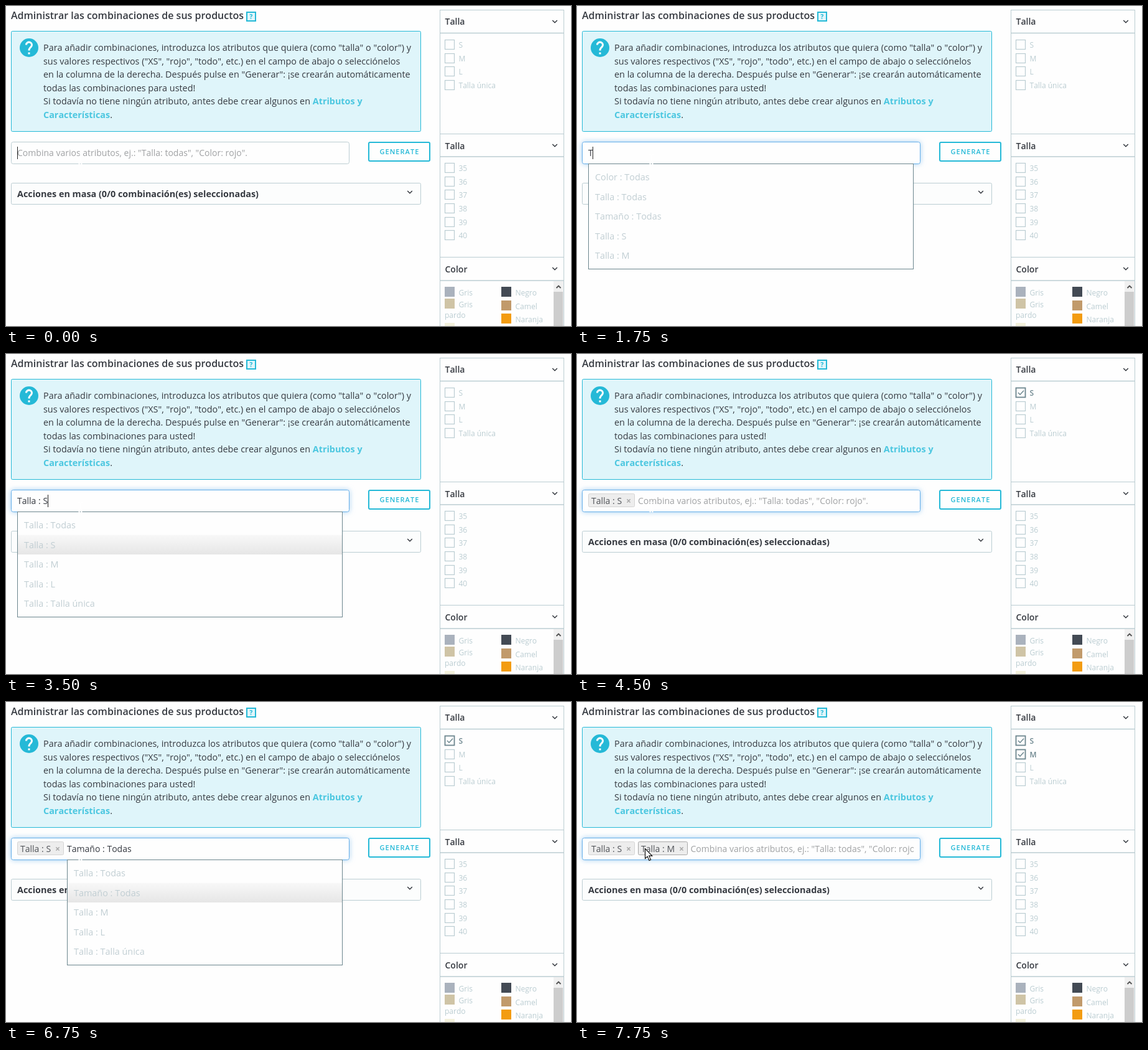
An HTML page for the animation above (8000 ms loop, 908 px wide and 514 px high).

```html
<!DOCTYPE html>
<html lang="es">
<head>
<meta charset="utf-8">
<title>Combinaciones</title>
<style>
  html, body { margin: 0; width: 100%; height: 100%; overflow: hidden; background: #fefefe; }
  svg { display: block; }
  text { font: 14px "Open Sans", sans-serif; font-kerning: none; fill: #363a41; }
  .title { font-size: 16px; font-weight: 600; }
  .body { font-size: 14.4px; }
  .bold { font-size: 14.4px; font-weight: 700; }
  .head { font-weight: 600; }
  .link { font-weight: 700; fill: #4cc7e0; }
  .hint { fill: #a0a2a4; }
  .item { font-size: 14.4px; fill: #c1ced3; }
  .label { font-size: 12px; fill: #bbcdd2; }
  .checked { font-size: 12px; font-weight: 600; fill: #6c868e; }
  .button { font-size: 11px; font-weight: 600; letter-spacing: 1.04px; fill: #25b9d7; }
  .badge { font-size: 10px; font-weight: 700; fill: #25b9d7; text-anchor: middle; }
  .chip { fill: #505358; }
  .close { font-weight: 700; fill: #a9a9a9; text-anchor: middle; }
  .field { fill: #fefefe; stroke: #bbcdd2; }
  .focus { stroke: #66afe9; filter: drop-shadow(0 0 4px rgba(102, 175, 233, .6)); }
</style>
</head>
<body>
<svg width="908" height="514" viewBox="0 0 908 514">
  <defs>
    <linearGradient id="pick" x2="0" y2="1">
      <stop stop-color="#f8f8f8"/><stop offset="1" stop-color="#e6e6e6"/>
    </linearGradient>
    <clipPath id="inside"><rect x="9" y="219" width="532" height="34"/></clipPath>
  </defs>
  <g id="page"></g>
  <g id="live"></g>
</svg>
<script>
const page = document.getElementById('page');
const live = document.getElementById('live');

const text = (x, y, string, kind = '') => `<text x="${x}" y="${y}" class="${kind}">${string}</text>`;
const rect = (x, y, w, h, look) => `<rect x="${x}" y="${y}" width="${w}" height="${h}" ${look}/>`;
const path = (d, look) => `<path d="${d}" ${look}/>`;
const chevron = (x, y) =>
  path(`M${x - 3.8} ${y - 2}l3.8 3.8 3.8-3.8`, 'fill="none" stroke="#363a41" stroke-width="1.5"');

const HINT = 'Combina varios atributos, ej.: "Talla: todas", "Color: rojo".';
const LINE = 'fill="none" stroke="#bbcdd2"';

function drawPage() {
  const help = [
    'Para añadir combinaciones, introduzca los atributos que quiera (como "talla" o "color") y',
    'sus valores respectivos ("XS", "rojo", "todo", etc.) en el campo de abajo o selecciónelos',
    'en la columna de la derecha. Después pulse en "Generar": ¡se crearán automáticamente',
    'todas las combinaciones para usted!',
    'Si todavía no tiene ningún atributo, antes debe crear algunos en <tspan class="link">Atributos y</tspan>',
    '<tspan class="link">Características</tspan>.'
  ];
  const panels = [['Talla', 6, 43], ['Talla', 205, 241.5], ['Color', 403, 440.5]];
  const colors = [
    [705, 451, '#aab2bd', 'Gris'], [705, 470, '#cfc4a6', 'Gris'], [705, 509, '#f3f1dc', ''],
    [796, 451, '#434a54', 'Negro'], [796, 473, '#c19a6b', 'Camel'], [796, 494, '#f39c11', 'Naranja']
  ];
  page.innerHTML =
    text(8, 21, 'Administrar las combinaciones de sus productos', 'title') +
    rect(387, 10, 14, 14, 'fill="#dff5fa" stroke="#25b9d7" stroke-width="2"') +
    text(394, 21, '?', 'badge') +
    rect(8.5, 40.5, 658, 161, 'rx="2" fill="#dff5fa" stroke="#25b9d7"') +
    '<circle cx="37" cy="67" r="15" fill="#25b9d7"/>' +
    path('M9 9a3 3 0 1 1 5.1 2.1l-.9.9Q12 13.2 12 15M12 17v2',
      'transform="translate(19 49) scale(1.5)" fill="none" stroke="#fff" stroke-width="2"') +
    help.map((line, i) => text(60, 72 + 21.6 * i, line, 'body')).join('') +
    rect(583, 219, 98, 30, 'rx="2" fill="#fefefe" stroke="#25b9d7" stroke-width="2"') +
    text(600.5, 238, 'GENERATE', 'button') +
    rect(8.5, 284.5, 658, 34, 'rx="2" fill="#fcfdfd" stroke="#bbcdd2"') +
    text(18, 307, 'Acciones en masa (0/0 combinación(es) seleccionadas)', 'bold') +
    chevron(649, 299) +
    rect(697.5, 6.5, 199, 520, LINE) +
    panels.map(([name, top, rule]) =>
      path(`M697 ${top + .5}H897`, LINE) +
      path(`M697 ${rule + .5}H897`, LINE + ' stroke-width="1.6"') +
      text(705.5, top + (top > 6 ? 24.5 : 24), name, 'head') +
      chevron(882, top + 19)).join('') +
    colors.map(([x, y, fill, name]) =>
      rect(x, y, 16, 16, `fill="${fill}"`) + text(x + 22.5, y + 13.8, name, 'label')).join('') +
    text(705, 501, 'pardo', 'label') +
    rect(880, 442, 16, 72, 'fill="#f0f0f0"') +
    rect(880, 459, 15, 55, 'fill="#cdcdcd"') +
    path('M884.5 453l3.5-3.5 3.5 3.5', 'fill="none" stroke="#505050" stroke-width="1.8"');
}

const checkbox = (y, name, on) =>
  rect(705.5, y + .5, 15, 15, `fill="#fefefe" stroke="${on ? '#6c868e' : '#bbcdd2'}" stroke-width="${on ? 1.8 : 1.2}"`) +
  (on ? path(`M709 ${y + 8}l3 3.2 6-6.4`, 'fill="none" stroke="#6c868e" stroke-width="1.5"') : '') +
  text(727.5, y + 13.3, name, on ? 'checked' : 'label');

const checkboxes = (top, names, chips) =>
  names.map((name, i) => checkbox(Math.round(top + 21.65 * i), name, chips.includes(name))).join('');

const CHIP_X = [18, 98], INPUT_X = [18, 98, 182.5];

const chip = (size, i, hover) => {
  const x = CHIP_X[i], w = i ? 79 : 74;
  return rect(x + .5, 224.5, w, 21, `rx="2" fill="#ededed" stroke="${hover ? '#a9a9a9' : '#d5d5d5'}"`) +
    text(x + 5, 241, 'Talla : ' + size, 'chip') + text(x + w - 9, 241, '×', 'close');
};

const dropdown = (x, items, pick) =>
  rect(x + .5, 253.5, 540 - x, 169, 'fill="#fefefe" stroke="#6c868e"') +
  (pick >= 0 ? rect(x + 1, 259 + 31.5 * pick, 539 - x, 31.5, 'fill="url(#pick)"') : '') +
  items.map((item, i) => text(x + 11, 280 + 31.5 * i, item, 'item')).join('');

const beam = path('M116.5 238.5h2l1 1 1-1h2M119.5 239v14M116.5 253.5h2l1-1 1 1h2', 'fill="none" stroke="#fff"');
const arrow = path('M109.5 235.5v16l3.7-3.4 2.8 6.4 2.6-1.1-2.8-6.3h5z', 'fill="#fff" stroke="#000" stroke-width="1.1"');

function draw({ focus, typed, chips, items, pick, caret, hover }) {
  const x = INPUT_X[chips.length];
  live.innerHTML =
    checkboxes(54, ['S', 'M', 'L', 'Talla única'], chips) +
    checkboxes(252, ['35', '36', '37', '38', '39', '40'], chips) +
    rect(8.5, 218.5, 543, 35, `rx="3" class="field ${focus ? 'focus' : ''}"`) +
    chips.map((size, i) => chip(size, i, hover && i === 1)).join('') +
    `<g id="entry" clip-path="url(#inside)">${text(x, 241, typed || HINT, typed ? '' : 'hint')}</g>` +
    (items ? dropdown(CHIP_X[chips.length], items, pick) : '') +
    (hover ? arrow : beam);
  if (caret) {
    const width = typed ? live.querySelector('#entry text').getComputedTextLength() : 0;
    live.insertAdjacentHTML('beforeend', rect(Math.floor(x + width), 226, 1, 20, 'fill="#222"'));
  }
}

const all = name => name + ' : Todas';
const sizes = list => list.map(size => 'Talla : ' + size);
const [COLOR, SIZE, FIT] = ['Color', 'Talla', 'Tamaño'].map(all);

// Each step: start time in ms and what differs from the step before.
const steps = [
  [0, { focus: false, typed: '', chips: [], items: null, pick: -1, caret: true, hover: false }],
  [250, { focus: true }],
  [750, { caret: false }],
  [1250, { caret: true }],
  [1750, { typed: 'T', items: [COLOR, SIZE, FIT, ...sizes(['S', 'M'])] }],
  [2250, { typed: 'Ta', items: [SIZE, FIT, ...sizes(['S', 'M', 'L'])] }],
  [2500, { typed: 'Tal', items: [SIZE, ...sizes(['S', 'M', 'L', 'Talla única'])] }],
  [2750, { typed: 'Talla' }],
  [3250, { typed: SIZE, pick: 0 }],
  [3500, { typed: 'Talla : S', pick: 1 }],
  [4000, { typed: '', chips: ['S'], items: null, pick: -1 }],
  [4500, { caret: false }],
  [5000, { caret: true }],
  [5250, { typed: 'T', items: [COLOR, SIZE, FIT, ...sizes(['M', 'L'])] }],
  [5500, { typed: 'Ta', items: [SIZE, FIT, ...sizes(['M', 'L', 'Talla única'])] }],
  [6000, { caret: false }],
  [6250, { typed: FIT, pick: 1, caret: true }],
  [6750, { caret: false }],
  [7000, { typed: 'Talla : M', pick: 2, caret: true }],
  [7250, { typed: '', chips: ['S', 'M'], items: null, pick: -1 }],
  [7500, { hover: true }],
  [7750, { caret: false }]
];
const states = [];
steps.forEach(([, change], i) => states.push({ ...states[i - 1], ...change }));

let shown = -1;
function tick() {
  const time = performance.now() % 8000;
  const current = steps.filter(([start]) => start <= time).length - 1;
  if (current !== shown) draw(states[shown = current]);
  requestAnimationFrame(tick);
}

drawPage();
tick();
</script>
</body>
</html>
```
